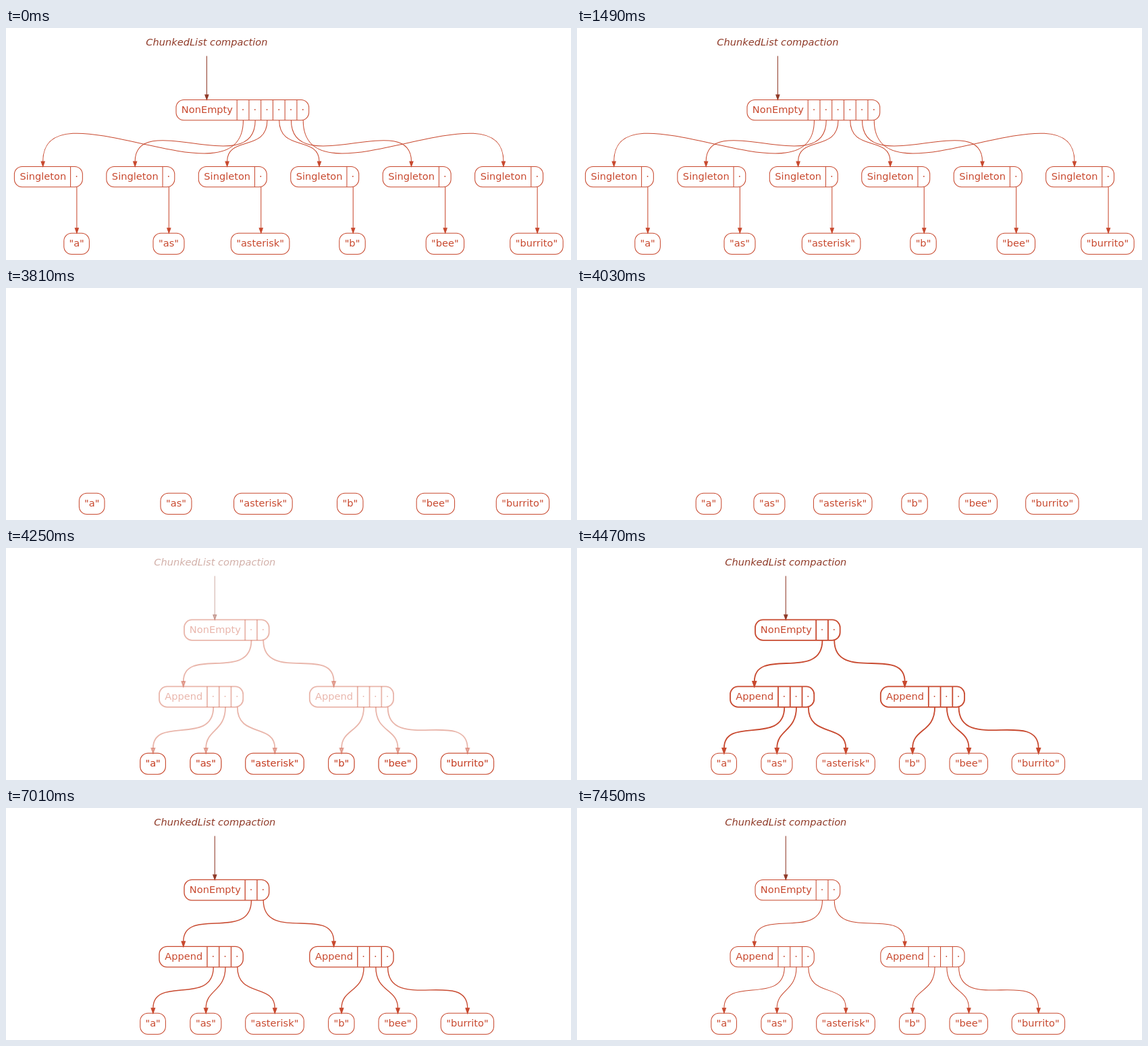
An HTML page with a canvas for the animation above (8 s loop, 837 by 344 pixels).

```html
<!DOCTYPE html>
<html lang="en">
<head>
<meta charset="utf-8">
<title>ChunkedList compaction</title>
<style>
html, body { margin: 0; width: 100%; height: 100%; overflow: hidden; background: #fff; }
canvas { display: block; }
</style>
</head>
<body>
<canvas id="stage" width="837" height="344"></canvas>
<script>
const ctx = document.getElementById('stage').getContext('2d');
const LOOP = 8000, STEP = 110, REGROUP = 3480, SETTLE = 6460;
const RED = '#c8492f', DARK = '#8f3a28';
const THIN = 1.04, THICK = 1.8;
const FONT = '14.6px "DejaVu Sans", sans-serif';
const ROOT_Y = 106.4, MID_Y = 205.4, LEAF_Y = 304.2, ROW_H = 30.4;

// Each leaf slides from one x centre to the other.
const leaves = [
  { text: '"a"', w: 37.6, from: 104.6, to: 217.6 },
  { text: '"as"', w: 46, from: 241, to: 295.9 },
  { text: '"asterisk"', w: 86.6, from: 376.6, to: 398 },
  { text: '"b"', w: 38.4, from: 513, to: 496.8 },
  { text: '"bee"', w: 56.4, from: 650.4, to: 580.2 },
  { text: '"burrito"', w: 78.4, from: 786, to: 683.4 }
];

const clamp = v => Math.max(0, Math.min(1, v));
const mix = (a, b, k) => a + (b - a) * k;

// Progress in tenths, the first tenth being reached at `start`.
const progress = (t, start) => clamp((Math.floor((t - start) / STEP) + 1) / 10);

function setColor(color) {
  ctx.fillStyle = ctx.strokeStyle = color;
}

function label(text, x, y, style = '') {
  ctx.font = style + FONT;
  ctx.fillText(text, x, y);
}

function box(x, y, w, h) {
  ctx.beginPath();
  ctx.roundRect(x, y, w, h, 11.5);
  ctx.stroke();
}

function line(x, y1, y2) {
  ctx.beginPath();
  ctx.moveTo(x, y1);
  ctx.lineTo(x, y2);
  ctx.stroke();
}

function arrowHead(x, tip) {
  ctx.beginPath();
  ctx.moveTo(x, tip);
  ctx.lineTo(x - 2.6, tip - 7.4);
  ctx.lineTo(x + 2.6, tip - 7.4);
  ctx.closePath();
  ctx.fill();
  ctx.stroke();
}

// The wider the span, the further the curve swings past its ends.
function edge(x1, y1, x2, tip) {
  const span = Math.abs(x2 - x1), y2 = tip - 7.4;
  ctx.beginPath();
  ctx.moveTo(x1, y1);
  if (span < 2) ctx.lineTo(x2, y2);
  else ctx.bezierCurveTo(x1, y1 + 26 + span * 0.36, x2, y1 + 43 - span * 0.345, x2, y2);
  ctx.stroke();
  arrowHead(x2, tip);
}

const CELL = 17.75;

// Draws a record and returns the x of each of its pointer cells.
function record(name, x, y, nameW, cells) {
  box(x, y, nameW + cells * CELL, ROW_H);
  label(name, x + nameW / 2 + 0.8, y + 19.8);
  return Array.from({ length: cells }, (_, i) => {
    const left = x + nameW + i * CELL;
    line(left, y, y + ROW_H);
    label('·', left + CELL / 2, y + 19.8);
    return left + CELL / 2 + 0.4;
  });
}

function title(x) {
  setColor(DARK);
  const width = ctx.lineWidth;
  ctx.lineWidth = THIN;
  label('ChunkedList compaction', x, 25.7, 'italic ');
  line(x, 41.5, ROOT_Y - 7.4);
  arrowHead(x, ROOT_Y);
  ctx.lineWidth = width;
  setColor(RED);
}

function drawLeaves(k) {
  ctx.lineWidth = THIN;
  for (const leaf of leaves) {
    const x = mix(leaf.from, leaf.to, k);
    box(x - leaf.w / 2, LEAF_Y, leaf.w, 31.2);
    label(leaf.text, x, LEAF_Y + 19.6);
  }
}

function drawFlat() {
  ctx.lineWidth = THIN;
  title(297.4);
  record('NonEmpty', 252, ROOT_Y, 90.2, 6).forEach((start, i) => {
    const x = 12.4 + i * 136.45;
    edge(start, ROOT_Y + ROW_H, x + 42.3, MID_Y);
    const [cell] = record('Singleton', x, MID_Y, 83.2, 1);
    edge(cell, MID_Y + ROW_H, cell, LEAF_Y);
  });
  drawLeaves(0);
}

function drawGrouped(width) {
  ctx.lineWidth = width;
  title(309.3);
  record('NonEmpty', 264, ROOT_Y, 90.2, 2).forEach((start, group) => {
    const x = 227 + group * 222.8;
    edge(start, ROOT_Y + ROW_H, x + 35.8, MID_Y);
    record('Append', x, MID_Y, 71, 3).forEach((cell, i) => {
      edge(cell, MID_Y + ROW_H, leaves[group * 3 + i].to + 0.3, LEAF_Y);
    });
  });
  drawLeaves(1);
}

function draw(t) {
  ctx.globalAlpha = 1;
  ctx.fillStyle = '#fff';
  ctx.fillRect(0, 0, 837, 344);
  ctx.textAlign = 'center';
  setColor(RED);

  // Three equal phases: fade out, slide the leaves, fade in.
  const phase = progress(t, REGROUP) * 3;
  const width = mix(THICK, THIN, progress(t, SETTLE));
  if (phase > 0 && phase < 3) drawLeaves(clamp(phase - 1));
  if (phase < 1) {
    ctx.globalAlpha = 1 - phase;
    drawFlat();
  } else if (phase > 2) {
    ctx.globalAlpha = phase - 2;
    drawGrouped(width);
  }
}

let origin;
function tick(now) {
  origin ??= now;
  draw((now - origin) % LOOP);
  requestAnimationFrame(tick);
}
draw(0);
requestAnimationFrame(tick);
</script>
</body>
</html>
```
